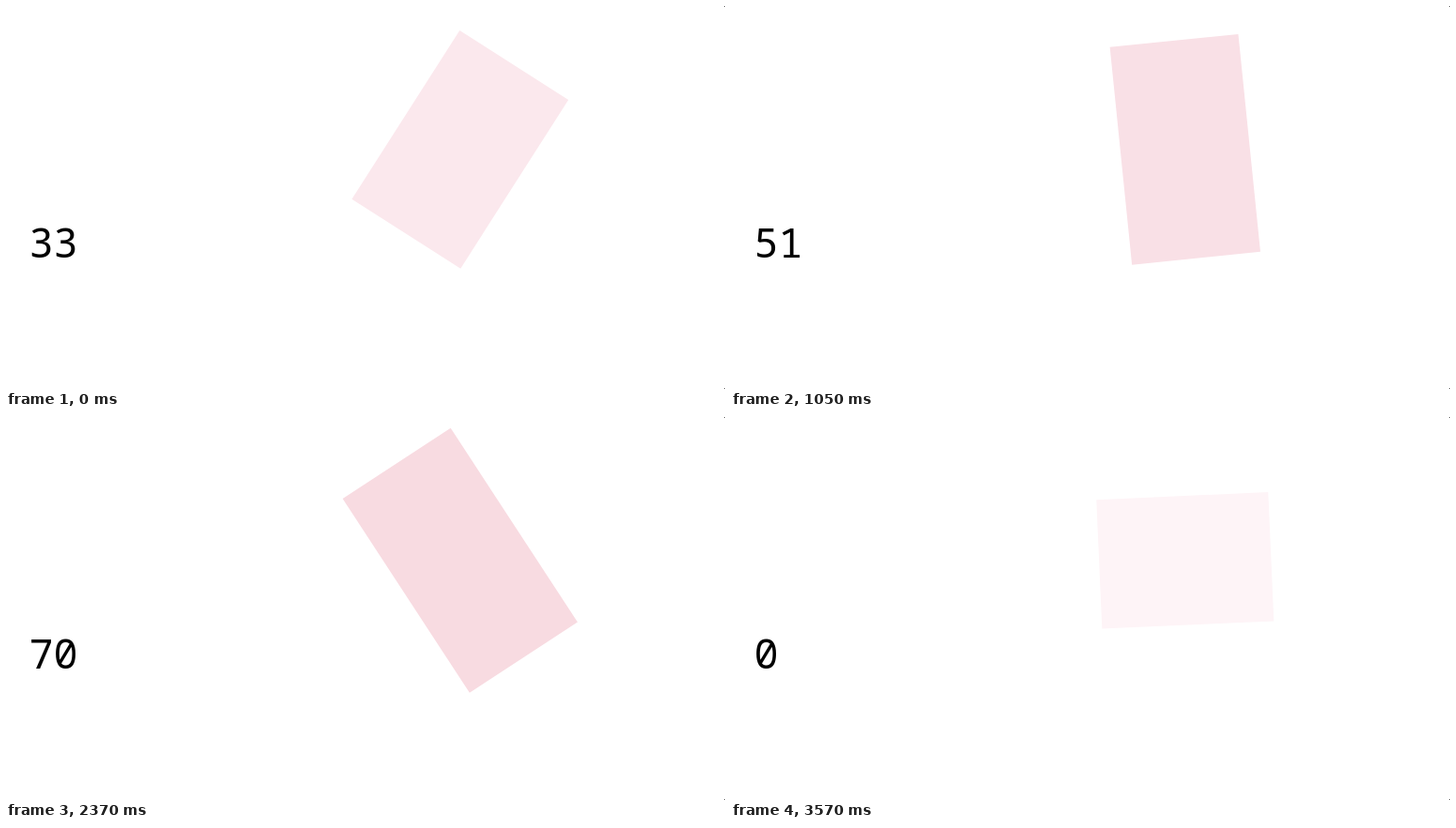
Animation of 766 by 408 pixels, one loop 3600 ms. Source, as an HTML page:

```html
<!DOCTYPE html>
<html lang="en">
<head>
<meta charset="utf-8">
<title>Rotating rectangle with counter</title>
<style>
  html, body { margin: 0; width: 100%; height: 100%; overflow: hidden; background: #fff; }
  svg { display: block; width: 766px; height: 408px; }
  text { font: 43.5px "Noto Sans Mono", monospace; fill: #000; }
</style>
</head>
<body>
<svg viewBox="0 0 766 408">
  <rect id="box" y="-68.75" height="137.5"/>
  <text id="count" x="24.4" y="268.3"></text>
  <path d="M765 0h1v1h-1zM765 407h1v1h-1z" fill="#666"/>
</svg>
<script>
const LOOP = 3600, STEP = 30;
const REST = 1.4;        // lowest progress the rectangle settles at
const TEXT_LEAD = 15;    // the counter runs slightly ahead of the rectangle
const IDLE = { from: 1530, tick: 1680, to: 1830 };

// [time in ms, progress in percent]
const track = [
  [0, 31.9], [613, 100], [629, 100], [1529, 0],
  [1754, 0], [2654, 100], [3554, 0], [LOOP, 0]
];

const box = document.getElementById("box");
const count = document.getElementById("count");

function progress(time) {
  const t = Math.min(time, LOOP);
  const i = Math.max(1, track.findIndex(([end]) => t <= end));
  const [t0, v0] = track[i - 1];
  const [t1, v1] = track[i];
  return v0 + (v1 - v0) * (t - t0) / (t1 - t0);
}

function draw(t) {
  const idle = t >= IDLE.from && t < IDLE.to;
  const raw = idle ? 0 : progress(t);
  const v = Math.max(REST, raw);
  const width = raw < REST ? 183.2 : 184 + 0.92 * v;
  const rise = v - REST;
  const color = [254 - 0.092 * rise, 244 - 0.378 * rise, 247 - 0.321 * rise].map(Math.round);

  box.setAttribute("x", -width / 2);
  box.setAttribute("width", width);
  box.setAttribute("transform", `translate(483.8 152.8) rotate(${-1.8 * v})`);
  box.setAttribute("fill", `rgb(${color})`);
  count.textContent = idle ? Number(t >= IDLE.tick) : Math.floor(progress(t + TEXT_LEAD));
}

const start = performance.now();
function tick() {
  const t = (performance.now() - start) % LOOP;
  draw(Math.floor(t / STEP) * STEP);
  requestAnimationFrame(tick);
}
tick();
</script>
</body>
</html>
```
